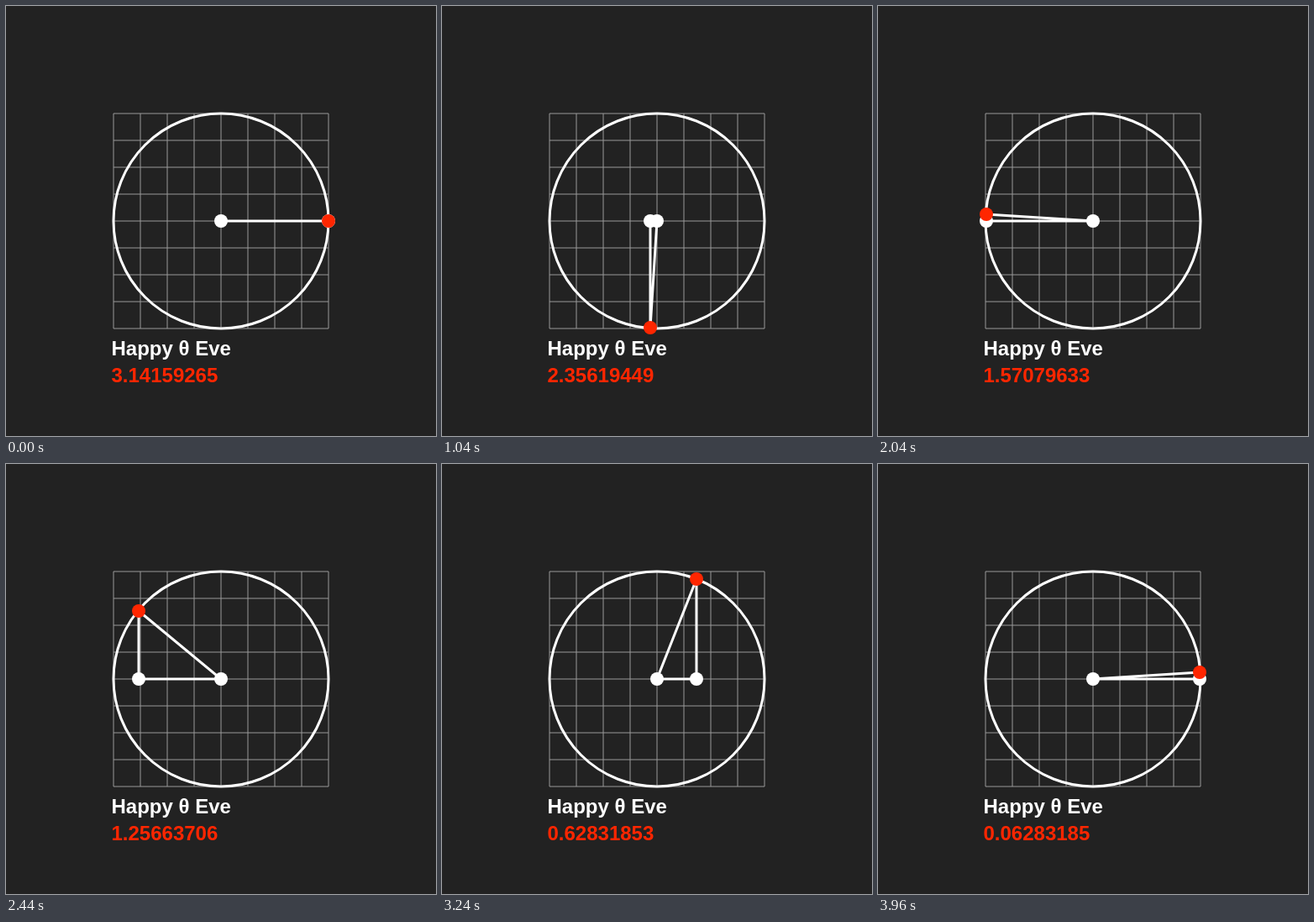
These frames come from a looping animation (512x512 px, 4 s). An HTML page with a canvas:

```html
<!DOCTYPE html>
<html lang="en">
<head>
<meta charset="utf-8">
<title>Unit circle</title>
<style>
  html, body { margin: 0; width: 100%; height: 100%; overflow: hidden; background: #222; }
  canvas { display: block; }
</style>
</head>
<body>
<canvas id="stage" width="512" height="512"></canvas>
<script>
const ctx = document.getElementById('stage').getContext('2d');
const CENTER = 256, RADIUS = 128, CELL = 32;
const STEPS = 100, STEP_MS = 40;
const WHITE = '#fff', RED = '#ff2600';

function strokePath(points, color, width) {
  ctx.beginPath();
  points.forEach(([x, y]) => ctx.lineTo(x, y));
  ctx.strokeStyle = color;
  ctx.lineWidth = width;
  ctx.stroke();
}

function dot(x, y, color) {
  ctx.beginPath();
  ctx.arc(x, y, 8, 0, 2 * Math.PI);
  ctx.fillStyle = color;
  ctx.fill();
}

function label(text, y, color) {
  ctx.fillStyle = color;
  ctx.fillText(text, 125.5, y);
}

function draw(step) {
  ctx.fillStyle = '#222';
  ctx.fillRect(0, 0, 512, 512);

  const low = CENTER - RADIUS, high = CENTER + RADIUS;
  for (let p = low; p <= high; p += CELL) {
    strokePath([[p, low], [p, high]], '#999', 1);
    strokePath([[low, p], [high, p]], '#999', 1);
  }

  ctx.beginPath();
  ctx.arc(CENTER, CENTER, RADIUS, 0, 2 * Math.PI);
  ctx.strokeStyle = WHITE;
  ctx.lineWidth = 3;
  ctx.stroke();

  // The moving point sits on whole pixels.
  const angle = 2 * Math.PI * step / STEPS;
  const x = CENTER + Math.trunc(RADIUS * Math.cos(angle));
  const y = CENTER + Math.trunc(RADIUS * Math.sin(angle));
  strokePath([[x, y], [CENTER, CENTER], [x, CENTER], [x, y]], WHITE, 3);
  dot(CENTER, CENTER, WHITE);
  dot(x, CENTER, WHITE);
  dot(x, y, RED);

  // The counter trails the point by one step.
  const counted = Math.max(0, step - 1);
  ctx.font = 'bold 24px "Liberation Sans", Helvetica, Arial, sans-serif';
  label('Happy θ Eve', 416, WHITE);
  label((Math.PI * (1 - counted / STEPS)).toFixed(8), 448, RED);
}

function tick() {
  draw(Math.floor(performance.now() / STEP_MS) % STEPS);
  requestAnimationFrame(tick);
}
tick();
</script>
</body>
</html>
```
